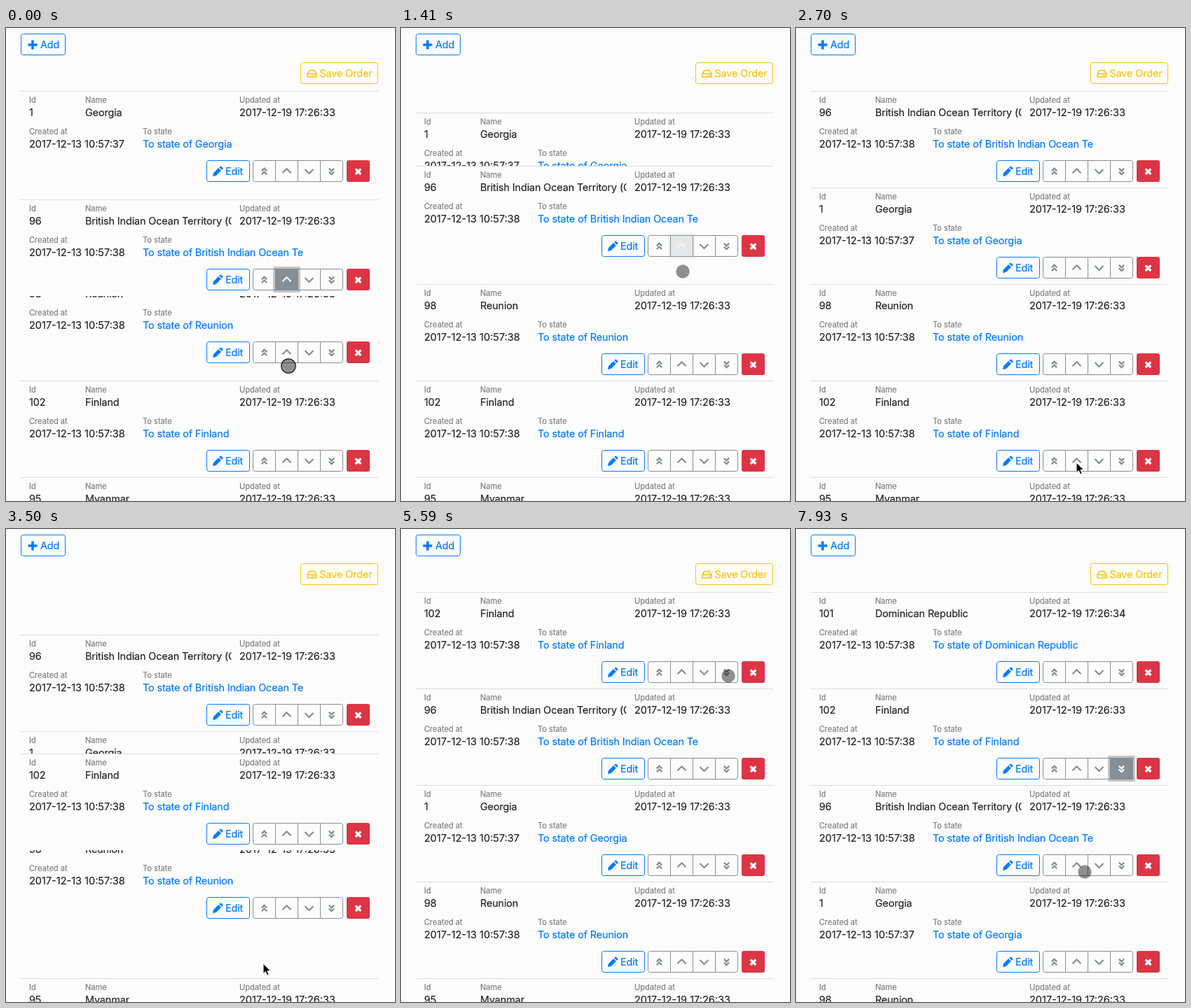
Recreate the animation shown at these times as an HTML page. Size 555 px wide and 676 px high, loop 7990 ms.

```html
<!DOCTYPE html>
<html>
<head>
<meta charset="utf-8">
<style>
  html, body { margin: 0; width: 100%; height: 100%; overflow: hidden; background: #fcfcfc; }
  svg { display: block; width: 555px; height: 676px; font: 14.4px Inter, Roboto, sans-serif; color: #212529; }
  text { fill: currentColor; stroke: currentColor; stroke-width: .2; letter-spacing: -.12px; }
  .date { font-size: 14.5px; letter-spacing: 0; }
  .label { font-size: 11.1px; letter-spacing: 0; color: #808080; }
  .blue { color: #007bff; }
  .yellow { color: #ffc107; }
  .solid { fill: currentColor; }
  .gray { color: #868e96; }
  .line { fill: none; stroke: currentColor; }
  .chevron { fill: none; stroke: #868e96; stroke-width: 2.2; }
  .white { stroke: #fff; }
</style>
</head>
<body>
<svg viewBox="0 0 555 676">
  <clipPath id="nameCell"><rect x="113" y="110" width="208.5" height="22"/></clipPath>
  <g class="blue">
    <rect class="line" x="21.5" y="8.5" width="63" height="30" rx="3"/>
    <path class="solid" d="M36.2 17.5h3.6v4.7h4.7v3.6h-4.7v4.7h-3.6v-4.7h-4.7v-3.6h4.7z"/>
    <text x="49" y="29">Add</text>
  </g>
  <g class="yellow">
    <rect class="line" x="420.5" y="49.5" width="110" height="30" rx="3"/>
    <path class="line" d="M430 65.5l3-5h7l3 5v4.5h-13zh13m-6 2.3h1.6m1 0h1.6" stroke-width="1.5" stroke-linejoin="round"/>
    <text x="447.5" y="70">Save Order</text>
  </g>
  <g id="rows"></g>
  <g id="cursor">
    <g id="dot">
      <circle r="9.7" fill-opacity=".43"/>
      <circle id="ring" r="10.2" fill="none" stroke="#111" stroke-width="1.2"/>
    </g>
    <path id="arrow" d="M0 0V14.5l3.3-3 2.4 5.4 2.5-1.1-2.3-5.2h4.6z" stroke="#fff"/>
  </g>
</svg>
<script>
const LOOP = 7990, ROW_HEIGHT = 138, SLIDE = 333;
const $ = id => document.getElementById(id);
const clamp = v => Math.min(1, Math.max(0, v));
const swing = v => 0.5 - Math.cos(Math.PI * clamp(v)) / 2;

// Painted in this order, so later rows slide over earlier ones.
const rows = [
  { id: 1, name: 'Georgia', made: 37 },
  { id: 98, name: 'Reunion' },
  { id: 95, name: 'Myanmar' },
  { id: 96, name: 'British Indian Ocean Territory (Chagos)' },
  { id: 102, name: 'Finland' },
  { id: 101, name: 'Dominican Republic', updated: 34 }
];

// Each move lifts one row to a higher slot and pushes the others down.
const firstOrder = [1, 98, 96, 102, 95, 101];
const moves = [
  { id: 96, slot: 1, end: 76 },
  { id: 96, slot: 0, end: 1640 },
  { id: 102, slot: 0, end: 3680 },
  { id: 101, slot: 0, end: 6450 }
];
let order = firstOrder;
for (const move of moves) {
  order = order.filter(id => id !== move.id);
  order.splice(move.slot, 0, move.id);
  move.order = order;
}

const rest = { x: 403, y: 483 };
const hops = [
  { from: 520, to: 850, x: 402, y: 348 },
  { from: 1890, to: 2050, x: 389, y: 612 },
  { from: 2230, to: 2450, x: 400, y: 621 },
  { from: 2720, to: 2960, x: 367, y: 621 },
  { from: 4020, to: 4220, x: 488, y: 336 },
  { from: 4400, to: 5180, x: 470, y: 223 },
  { from: 5240, to: 5590, x: 467, y: 210 },
  { from: 6130, to: 6990, x: 465, y: 221 },
  { from: 6990, to: 7930, x: 412, y: 490 }
];

// A positive rise points up, a negative one down.
const chevron = (x, y, half, rise) => `M${x - half} ${y + rise / 2}l${half} ${-rise} ${half} ${rise}`;
const double = (x, rise) => chevron(x, 202.5, 3.7, rise) + chevron(x, 207.3, 3.7, rise);
const icons = {
  first: double(368.5, 3.7),
  up: chevron(400.5, 204.3, 6, 6),
  down: chevron(432.5, 205, 6, -6),
  last: double(464.5, -3.7)
};

const text = (x, y, value, cls = '') => `<text class="${cls}" x="${x}" y="${y}">${value}</text>`;
const field = (x, y, label, value, cls) => text(x, y, label, 'label') + text(x, y + 19, value, cls);
const focus = (id, x, icon) => `<g id="${id}">
  <g class="gray">
    <rect class="solid" x="${x - 3}" y="186" width="39" height="37" rx="2" opacity=".5"/>
    <rect class="solid" x="${x}" y="189" width="33" height="31"/>
  </g>
  <path class="chevron white" d="${icons[icon]}"/></g>`;
const focusOf = { 96: focus('focusUp', 384, 'up'), 102: focus('focusLast', 448, 'last') };

const rowMarkup = ({ id, name, made = 38, updated = 33 }) => `<g id="row${id}">
  <rect x="21" y="90" width="510" height="138" fill="#fcfcfc"/>
  <rect x="21" y="90" width="510" height="1" fill="#d9dbdd"/>
  ${field(33, 107, 'Id', id)}
  ${text(113, 107, 'Name', 'label')}
  <g clip-path="url(#nameCell)">${text(113, 126, name)}</g>
  ${field(333, 107, 'Updated at', '2017-12-19 17:26:' + updated, 'date')}
  ${field(33, 152, 'Created at', '2017-12-13 10:57:' + made, 'date')}
  ${field(195, 152, 'To state', 'To state of ' + name.slice(0, 23), 'blue')}
  <g class="blue">
    <rect class="line" x="286.5" y="189.5" width="61" height="30" rx="3"/>
    <path class="solid" d="M295 212l1-4.7 7.2-7.2 3.7 3.7-7.2 7.2zM304.2 199.1l1.5-1.4q.7-.6 1.4 0l2.2 2.2q.6.7 0 1.4l-1.4 1.5z"/>
    ${text(313, 210, 'Edit')}
  </g>
  <g class="gray">
    <rect class="line" x="352.5" y="189.5" width="128" height="30" rx="3"/>
    <path class="line" d="M384.5 190v30m32-30v30m32-30v30"/>
  </g>
  <path class="chevron" d="${Object.values(icons).join('')}"/>
  ${focusOf[id] || ''}
  <rect x="486" y="189" width="33" height="31" rx="3" fill="#dc3545"/>
  <path d="M498.7 201.4l7.6 7.6m0-7.6l-7.6 7.6" stroke="#fff" stroke-width="3.2"/></g>`;
$('rows').innerHTML = rows.map(rowMarkup).join('');

const show = (id, on) => $(id).style.display = on ? '' : 'none';
const place = (el, x, y) => el.setAttribute('transform', `translate(${x} ${y})`);

function setFocus(id, strength) {
  show(id, strength > 0);
  $(id).firstElementChild.setAttribute('opacity', strength);
}

function draw(t) {
  for (const { id } of rows) {
    let slot = firstOrder.indexOf(id);
    for (const m of moves) slot += (m.order.indexOf(id) - slot) * swing(1 + (t - m.end) / SLIDE);
    place($('row' + id), 0, Math.round(slot * ROW_HEIGHT));
  }
  setFocus('focusUp', clamp((1435 - t) / 135));
  setFocus('focusLast', t >= 6130 ? 1 : 0);

  let { x, y } = rest;
  for (const h of hops) {
    const k = clamp((t - h.from) / (h.to - h.from));
    x += (h.x - x) * k;
    y += (h.y - y) * k;
  }
  place($('cursor'), x, y);
  const pointing = t >= 2400 && t < 4040;
  show('arrow', pointing);
  show('dot', !pointing);
  show('ring', t < 520);
}

const begin = performance.now();
function tick() {
  draw((performance.now() - begin) % LOOP);
  requestAnimationFrame(tick);
}
tick();
</script>
</body>
</html>
```
